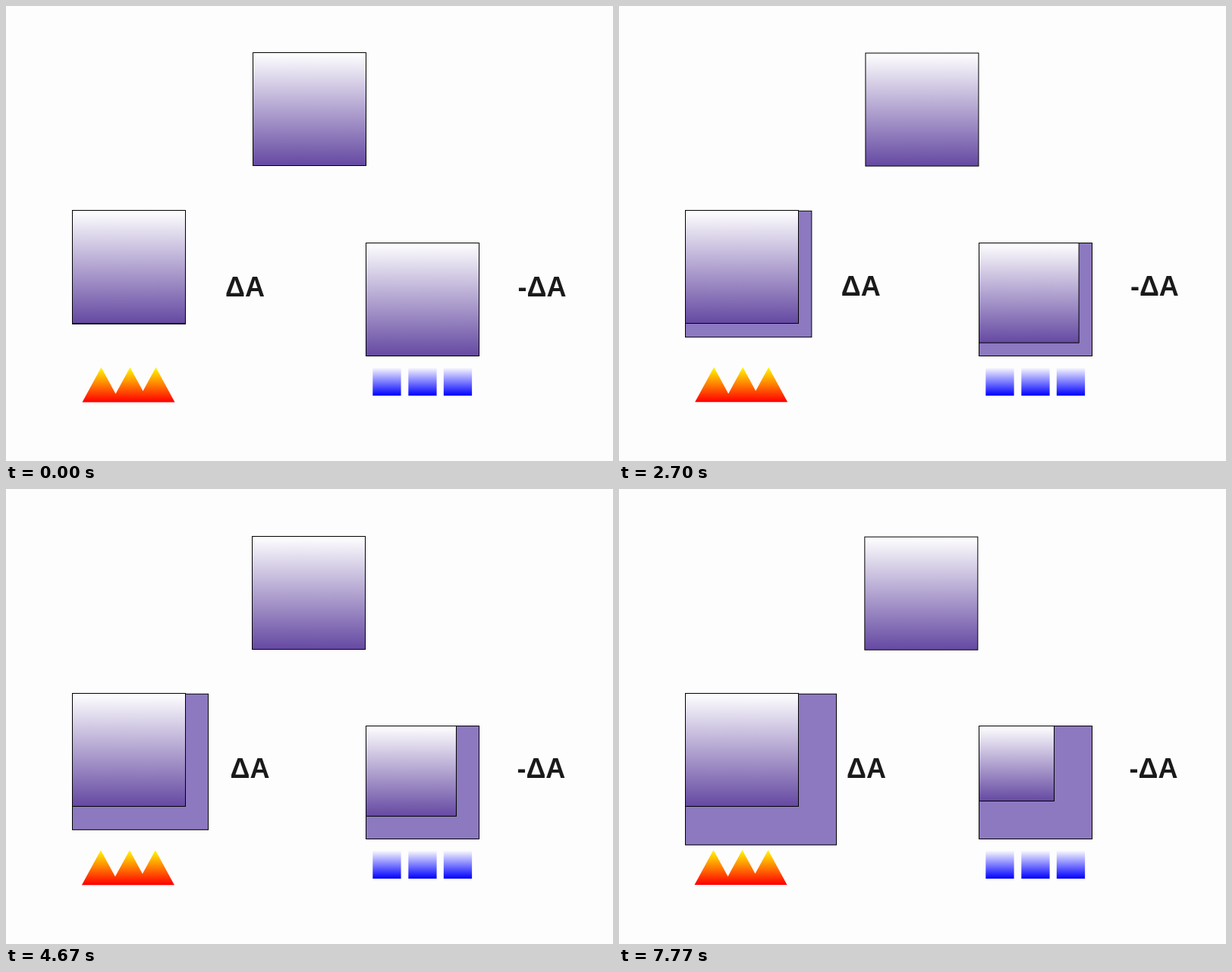
Write an HTML page that moves like this. It is 800 px wide and 600 px high and loops after 7810 ms.

```html
<!DOCTYPE html>
<html lang="en">
<head>
<meta charset="utf-8">
<title>Changing areas</title>
<style>
  html, body { margin: 0; width: 100%; height: 100%; overflow: hidden; background: #fdfdfd; }
  svg { display: block; width: 800px; height: 600px; }
  text { font: bold 36px "Liberation Sans", Arial, sans-serif; fill: #1a1a1a; }
  .box { stroke: #000; stroke-width: 1; }
</style>
</head>
<body>
<svg viewBox="0 0 800 600">
  <defs>
    <linearGradient id="dusk" x2="0" y2="1">
      <stop offset="0" stop-color="#fff"/>
      <stop offset="1" stop-color="#6549a2"/>
    </linearGradient>
    <linearGradient id="fire" gradientUnits="userSpaceOnUse" x1="0" y1="476" x2="0" y2="522">
      <stop offset="0" stop-color="#ff0"/>
      <stop offset="1" stop-color="#f00"/>
    </linearGradient>
    <linearGradient id="ice" x2="0" y2="1">
      <stop offset="0" stop-color="#fff"/>
      <stop offset="1" stop-color="#00f"/>
    </linearGradient>
  </defs>
  <rect id="top" class="box" x="325.5" y="61.5" width="149" height="149" fill="url(#dusk)"/>
  <rect id="grow" class="box" x="87.5" y="270.3" fill="#8c79c0"/>
  <rect class="box" x="87.5" y="269.5" width="149" height="149" fill="url(#dusk)"/>
  <rect class="box" x="474.5" y="312.5" width="149" height="149" fill="#8c79c0"/>
  <rect id="shrink" class="box" x="474.5" y="312.5" fill="url(#dusk)"/>
  <path id="flames" fill="url(#fire)" d="M100.5 522.5l25-46 25 46zM138.5 522.5l25-46 25 46zM172.5 522.5l25-46 25 46z"/>
  <g fill="url(#ice)">
    <rect x="483.3" y="476.3" width="37.3" height="37.5"/>
    <rect x="530.3" y="476.3" width="37.3" height="37.5"/>
    <rect x="576.8" y="476.3" width="37.3" height="37.5"/>
  </g>
  <text id="gain" x="289" y="382.5">ΔA</text>
  <text id="loss" x="674.6" y="382.5">-ΔA</text>
</svg>
<script>
  const LOOP = 7810, LAST_STEP = 233, SIDE = 149, CHANGE = 50;
  const part = id => document.getElementById(id);
  const [top_, grow, shrink, flames, gain, loss] =
    ["top", "grow", "shrink", "flames", "gain", "loss"].map(part);

  const shift = (el, x, y) => el.setAttribute("transform", `translate(${x} ${y})`);
  const resize = (el, size) => {
    el.setAttribute("width", size);
    el.setAttribute("height", size);
  };

  function draw(time) {
    // 30 steps per second
    const p = Math.min(1, Math.floor((time % LOOP + 4) * 0.03) / LAST_STEP);
    shift(top_, -1.65 * p, 1.65 * p);
    shift(flames, -p, -0.5 * p);
    shift(gain, 11 * p, -2 * p);
    shift(loss, -2 * p, -2 * p);
    resize(grow, SIDE + CHANGE * p);
    resize(shrink, SIDE - CHANGE * p);
  }

  const start = performance.now();
  function tick() {
    draw(performance.now() - start);
    requestAnimationFrame(tick);
  }
  tick();
</script>
</body>
</html>
```
